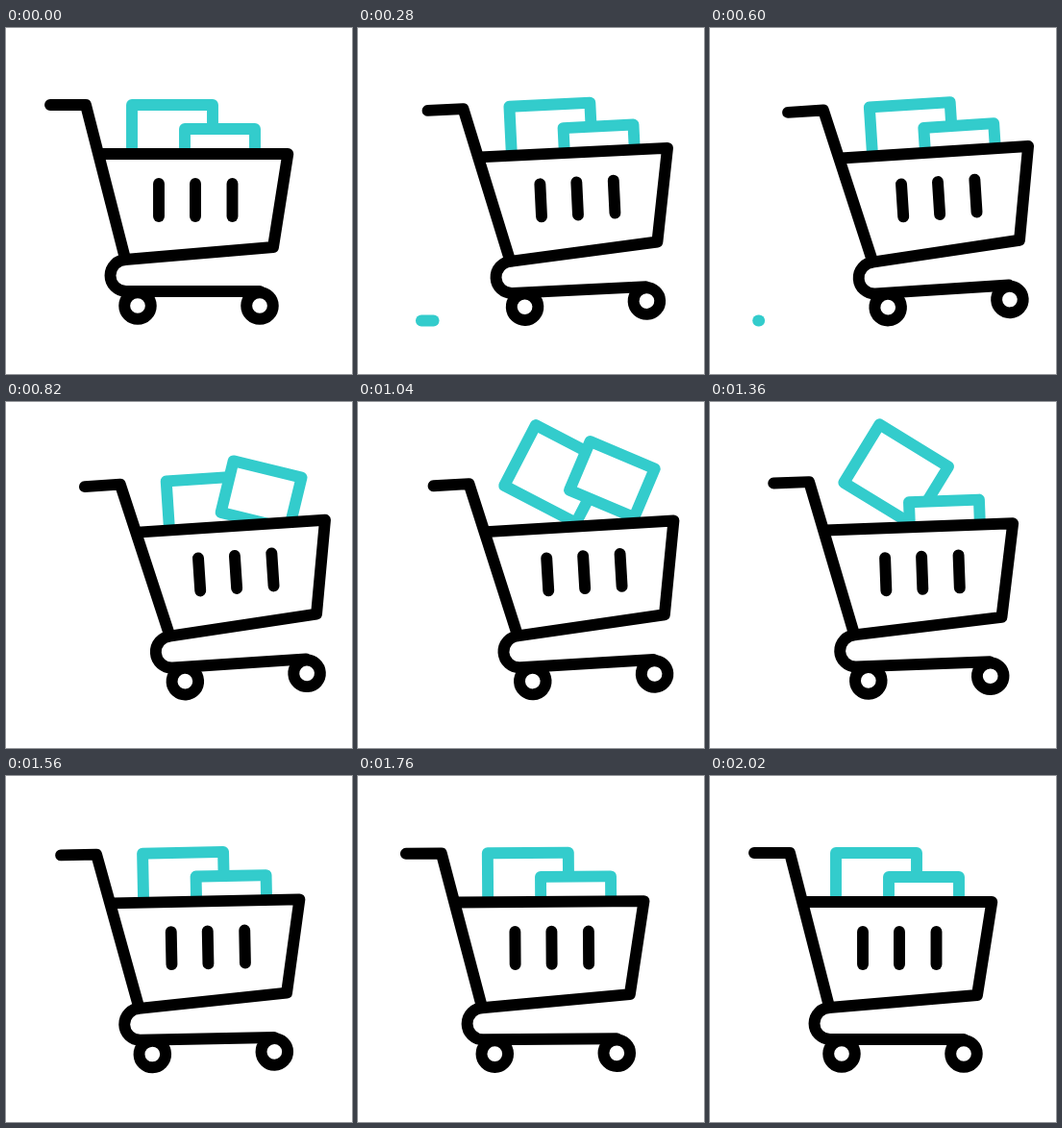
An HTML page with a canvas for the animation above (2.42 s loop, 360x360 px).

```html
<!DOCTYPE html>
<html lang="en">
<head>
<meta charset="utf-8">
<title>Shopping cart</title>
<style>
html, body { margin: 0; width: 100%; height: 100%; overflow: hidden; background: #fff; }
canvas { display: block; width: 100vmin; height: 100vmin; }
</style>
</head>
<body>
<canvas id="stage"></canvas>
<script>
const LOOP = 2420, PEAK = 800, END = 2020, REACH = 49.4;
const TEAL = '#33cccc', BLACK = '#000';
const canvas = document.getElementById('stage');
const ctx = canvas.getContext('2d');

function resize() {
  const side = Math.min(innerWidth, innerHeight) || 360;
  canvas.width = canvas.height = Math.round(side * (devicePixelRatio || 1));
}
addEventListener('resize', resize);
resize();

const clamp = v => Math.max(0, Math.min(1, v));

// Quick start and a long, soft stop: cubic bezier (0.25, 0, 0, 1)
function rush(p) {
  let lo = 0, hi = 1;
  for (let i = 0; i < 24; i++) {
    const s = (lo + hi) / 2;
    if (0.75 * (1 - s) ** 2 * s + s ** 3 < p) lo = s; else hi = s;
  }
  return 3 * (1 - lo) * lo * lo + lo ** 3;
}

// How far the cart has rolled, 0 to 1
function roll(t) {
  if (t < PEAK) return rush(t / PEAK);
  return (1 + Math.cos(Math.PI * clamp((t - PEAK) / (END - PEAK)))) / 2;
}

// Height of a thrown box, 0 to 1
function toss(t, from, to) {
  const p = clamp((t - from) / (to - from));
  return 4 * p * (1 - p);
}

function line(points) {
  ctx.beginPath();
  points.forEach(([x, y]) => ctx.lineTo(x, y));
  ctx.stroke();
}

function box(cx, cy, w, h, deg) {
  ctx.save();
  ctx.translate(cx, cy);
  ctx.rotate(deg * Math.PI / 180);
  ctx.beginPath();
  ctx.rect(-w / 2, -h / 2, w, h);
  ctx.fill();
  ctx.stroke();
  ctx.restore();
}

function boxes(t) {
  const big = toss(t, 866, 1532), turn = toss(t, 880, 1545);
  const small = toss(t, 684, 1346);
  ctx.save();
  ctx.beginPath();
  ctx.rect(-100, -200, 600, 331);
  ctx.clip();
  ctx.strokeStyle = TEAL;
  box(173 + big, 115.5 - 52 * big, 84, 71, 42 * turn);
  box(222.5 + 9.5 * small, 132.5 - 48.5 * small, 73, 55, 26.5 * small);
  ctx.restore();
}

function cart() {
  ctx.strokeStyle = BLACK;
  line([[46, 80], [83, 80], [124, 240]]);
  ctx.beginPath();
  ctx.moveTo(98, 131);
  ctx.lineTo(293.3, 131);
  ctx.lineTo(278, 228);
  ctx.lineTo(124, 241);
  ctx.arc(125, 257.5, 16.5, -Math.PI / 2, Math.PI / 2, true);
  ctx.lineTo(264, 274);
  ctx.stroke();
  for (const x of [159, 197, 235.5]) line([[x, 162], [x, 196]]);
  for (const x of [137, 264]) {
    ctx.beginPath();
    ctx.arc(x, 289, 13.8, 0, Math.PI * 2);
    ctx.fill();
    ctx.stroke();
  }
}

function dash(t) {
  const p = t / 680;
  if (p <= 0 || p >= 1) return;
  const head = 115.5 - 67 * rush(clamp(t / PEAK));
  const tail = Math.max(head, 48.5 + 67 * (1 - p) ** 1.5);
  if (tail - head < 0.3) return;
  ctx.strokeStyle = TEAL;
  line([[head, 304.5], [tail, 304.5]]);
}

function draw(t) {
  const k = canvas.width / 360;
  ctx.setTransform(k, 0, 0, k, 0, 0);
  ctx.fillStyle = '#fff';
  ctx.fillRect(0, 0, 360, 360);
  ctx.lineWidth = 11.9;
  ctx.lineCap = ctx.lineJoin = 'round';
  dash(t);
  // The cart tips back around its rear wheel as it rolls
  const dx = REACH * roll(t);
  ctx.translate(137 + dx, 289 + 0.034 * dx);
  ctx.rotate(-0.076 * dx * Math.PI / 180);
  ctx.translate(-137, -289);
  boxes(t);
  cart();
}

const start = performance.now();
function tick() {
  draw((performance.now() - start) % LOOP);
  requestAnimationFrame(tick);
}
tick();
</script>
</body>
</html>
```
